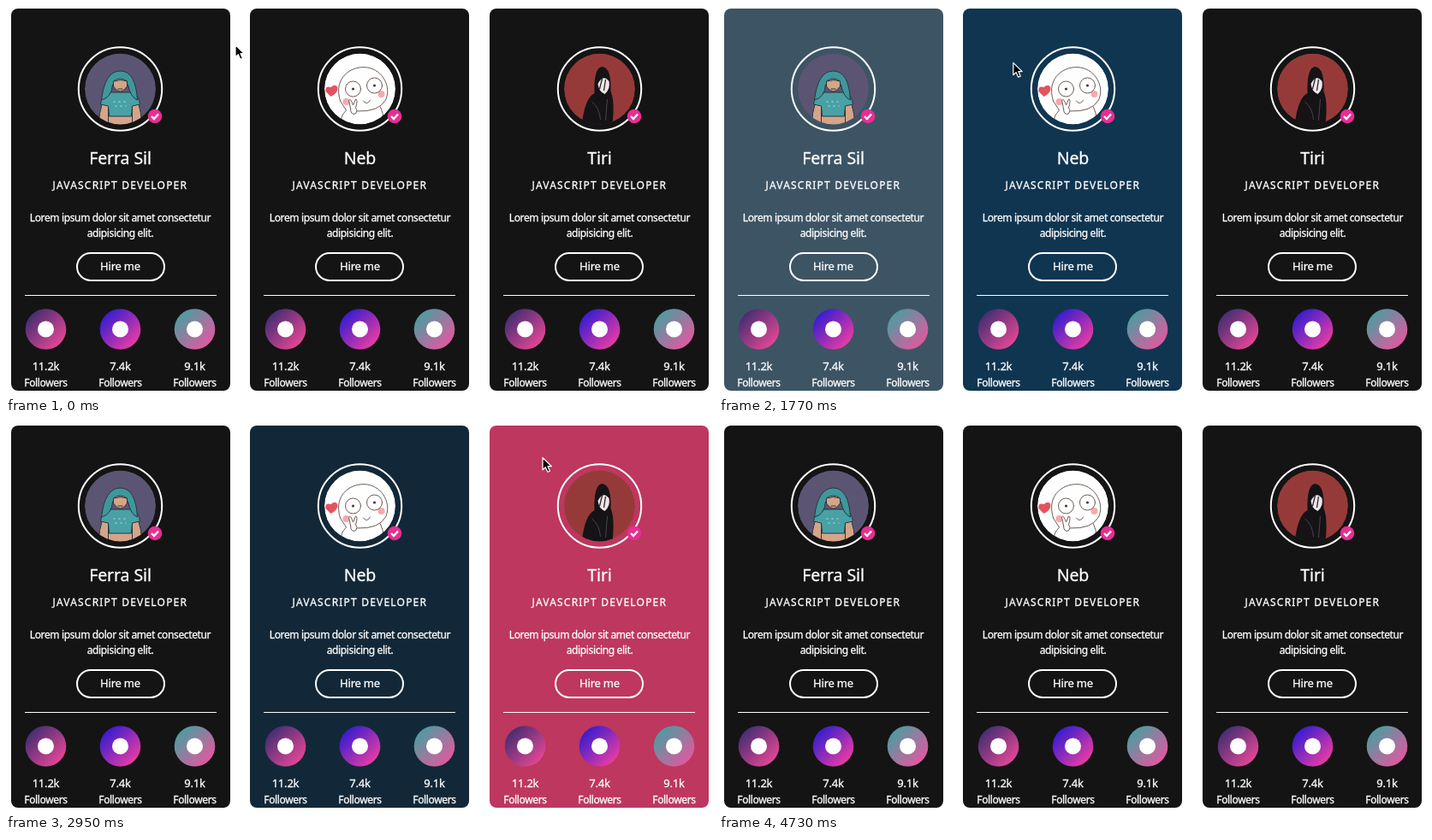
Write an HTML page that moves like this. It is 826x455 px and loops after 5330 ms.

```html
<!DOCTYPE html>
<html lang="en">
<head>
<meta charset="utf-8">
<title>Profile cards</title>
<style>
  html, body { margin: 0; width: 100%; height: 100%; overflow: hidden; background: #fff; }
  svg { display: block; width: 826px; height: 455px; }
  text {
    font: 12px "Noto Sans", "Open Sans", sans-serif; letter-spacing: -.37px;
    fill: #fff; stroke: #fff; stroke-width: .3px; text-anchor: middle;
  }
  .name { font-size: 19.5px; letter-spacing: -.1px; }
  .role { letter-spacing: 1.2px; }
  .button { font-size: 13px; letter-spacing: -.2px; }
  .count { font-size: 13px; letter-spacing: -.2px; }
</style>
</head>
<body>
<svg id="stage" viewBox="0 0 826 455" xmlns="http://www.w3.org/2000/svg"></svg>
<script>
const LOOP = 5330;
const FRAME = 147.7;      // the picture is held this long, in ms
const FADE = 350;
const POINTER_GONE = 4100;
const PITCH = 280;
const BASE = [20, 20, 20];

const mirrored = shape => `${shape}<g transform="scale(-1 1)">${shape}</g>`;

// Avatars are drawn around their own centre.
const hooded = `
  <circle r="41.5" fill="#5b5573"/>
  <g stroke="#26373f" stroke-linejoin="round">
    <path d="M-14 30H14V45H-14Z" fill="#d6a488"/>
    ${mirrored(`<path d="M-14 10Q-24 14-25 40H-14Z" fill="#d6a488"/>`)}
    <path d="M-14 4Q-22 8-23 18L-14 20L-13 32H13L14 20L23 18Q22 8 14 4Z" fill="#49a1a6"/>
    <path d="M-22 13Q-18-21 0-21T20 13Q12 10 9-5H-9Q-10 10-22 13Z" fill="#3f979c"/>
    <path d="M-8-9Q0-15 8-9V-3Q0 9-8-3Z" fill="#d6a488"/>
    <path d="M-7-9Q0-12 8-9M-3 0H3" fill="none"/>
  </g>
  <path d="M-8 15H8M-6 20H7" stroke="#bfe3df" stroke-dasharray="2 4"/>`;

const doodle = `
  <circle r="41.5" fill="#fff"/>
  <g fill="#f4a9ae"><circle cx="-16" cy="15" r="4"/><circle cx="25" cy="6" r="4"/></g>
  <g fill="none" stroke="#6d5a54" stroke-linecap="round">
    <path d="M-23 14C-32-14-9-28 9-25S37-2 30 13Q22 27-3 26M-23 14L-16 25Q-23 32-22 39M24 21Q28 29 27 36"/>
    <circle cx="-8" r="9"/><circle cx="17" cy="-4" r="9"/>
    <path d="M4 14Q8 20 12 13"/>
    <path d="M-11 23L-13 13Q-11 10-8 19L-5 12Q-2 12-5 22Q-2 25-5 29Q-11 31-11 23Z" fill="#fff"/>
  </g>
  <g fill="#4a3c39"><circle cx="-8" r="1.6"/><circle cx="17" cy="-4" r="1.6"/></g>
  <path d="M-34 9L-40 3Q-41-4-34-2Q-28-7-26-1Q-26 5-34 9Z" fill="#e5525f"/>`;

const coat = `
  <circle r="41.5" fill="#963a39"/>
  <path d="M-21 42Q-17 10-6 5Q-7-25 3-26Q14-25 13 3Q18 14 15 42Z" fill="#151316"/>
  <path d="M-2-6Q4-18 11-9Q13 0 6 6Q-1 3-2-6Z" fill="#eee7e8"/>
  <path d="M0 0L3-12M5 2L7-11" stroke="#29222a" stroke-width="1.3"/>
  <path d="M-9 15Q0 22 1 36M9 12L7 37" stroke="#4b4248" fill="none"/>`;

// hover: colour and the span of time in which the card is active
const people = [
  { name: "Ferra Sil", avatar: hooded, color: [82, 117, 143], hover: [500, 1700] },
  { name: "Neb", avatar: doodle, color: [6, 140, 238], hover: [1712, 2765] },
  { name: "Tiri", avatar: coat, color: [190, 55, 95], hover: [2650, 4320] }
];

const socials = [
  { count: "11.2k", from: "#3d2c70", to: "#ec4797" },
  { count: "7.4k", from: "#2d1bd2", to: "#f23da0" },
  { count: "9.1k", from: "#45a0a0", to: "#e8559f" }
];

const home = { x: 267.5, y: 45 };
const moves = [
  { from: 330, to: 880, x: 221.5, y: 62 },
  { from: 1480, to: 2030, x: 444, y: 75 },
  { from: 2365, to: 2950, x: 626.5, y: 40 },
  { from: 3730, to: 4320, x: 470, y: 284 }
];

const label = (x, y, content, kind = "") => `<text class="${kind}" x="${x}" y="${y}">${content}</text>`;

function social({ count }, i) {
  const x = 46.5 + 87 * i;
  return `
    <circle cx="${x}" cy="378" r="23.8" fill="url(#tint${i})"/>
    <circle cx="${x}" cy="378" r="9.5" fill="#fff"/>
    ${label(x, 426, count, "count")}${label(x, 445, "Followers")}`;
}

function card({ name, avatar }, i) {
  const snap = i ? -1 : 0; // boxes after the first round down a pixel
  return `<g transform="translate(${i * PITCH})">
    <rect class="card" x="${6 + snap}" y="3" width="256" height="447" rx="8"/>
    <circle cx="133.5" cy="97" r="48.7" fill="none" stroke="#fff" stroke-width="2"/>
    <g transform="translate(133.5 97)" clip-path="url(#round)">${avatar}</g>
    <circle cx="174" cy="129" r="8.3" fill="#e62e93"/>
    <path d="M170 129l3 3l5-5.5" fill="none" stroke="#fff" stroke-width="2.4"/>
    ${label(133.5, 185, name, "name")}
    ${label(133.3, 214, "JAVASCRIPT DEVELOPER", "role")}
    ${label(133.5, 252, "Lorem ipsum dolor sit amet consectetur")}
    ${label(133.5, 270, "adipisicing elit.")}
    <rect x="${83 + snap}" y="289" width="102" height="32" rx="16" fill="none" stroke="#fff" stroke-width="2"/>
    ${label(133.5, 309, "Hire me", "button")}
    <rect x="${22 + snap}" y="338" width="224" height="1" fill="#fff"/>
    ${socials.map(social).join("")}
  </g>`;
}

const tint = ({ from, to }, i) => `
  <linearGradient id="tint${i}" x2="1" y2="1">
    <stop offset=".1" stop-color="${from}"/><stop offset=".9" stop-color="${to}"/>
  </linearGradient>`;

const stage = document.getElementById("stage");
stage.innerHTML = `
  <defs>${socials.map(tint).join("")}<clipPath id="round"><circle r="41.5"/></clipPath></defs>
  ${people.map(card).join("")}
  <path id="pointer" d="M.5 .5V14.8L3.8 11.7L6.3 17.3L8.9 16.2L6.5 10.7H10.9Z"
    stroke="#fff" stroke-width="1.2" stroke-linejoin="round"/>`;

const cards = [...stage.querySelectorAll(".card")];
const pointer = document.getElementById("pointer");

const progress = (time, from, to) => Math.min(1, Math.max(0, (time - from) / (to - from)));
const ease = k => 1 - (1 - k ** 1.3) ** 3;
const smooth = k => k * k * (3 - 2 * k);
const lerp = (a, b, k) => a + (b - a) * k;

function hoverAmount(time, [enter, leave]) {
  const fade = start => ease(progress(time, start, start + FADE));
  return fade(enter) - fade(leave);
}

// Each move sweeps sideways first and bends up or down late.
function pointerAt(time) {
  return moves.reduce(({ x, y }, move) => {
    const k = smooth(progress(time, move.from, move.to));
    return { x: lerp(x, move.x, k), y: lerp(y, move.y, k * k) };
  }, home);
}

function draw(time) {
  const held = Math.floor((time + 7) / FRAME) * FRAME;
  people.forEach(({ color, hover }, i) => {
    const amount = hoverAmount(held, hover);
    const rgb = BASE.map((base, c) => Math.round(lerp(base, color[c], amount)));
    cards[i].setAttribute("fill", `rgb(${rgb})`);
  });
  const { x, y } = pointerAt(held);
  pointer.setAttribute("transform", `translate(${x} ${y})`);
  pointer.setAttribute("visibility", held < POINTER_GONE ? "visible" : "hidden");
}

const start = performance.now();
function tick() {
  draw((performance.now() - start) % LOOP);
  requestAnimationFrame(tick);
}
tick();
</script>
</body>
</html>
```
